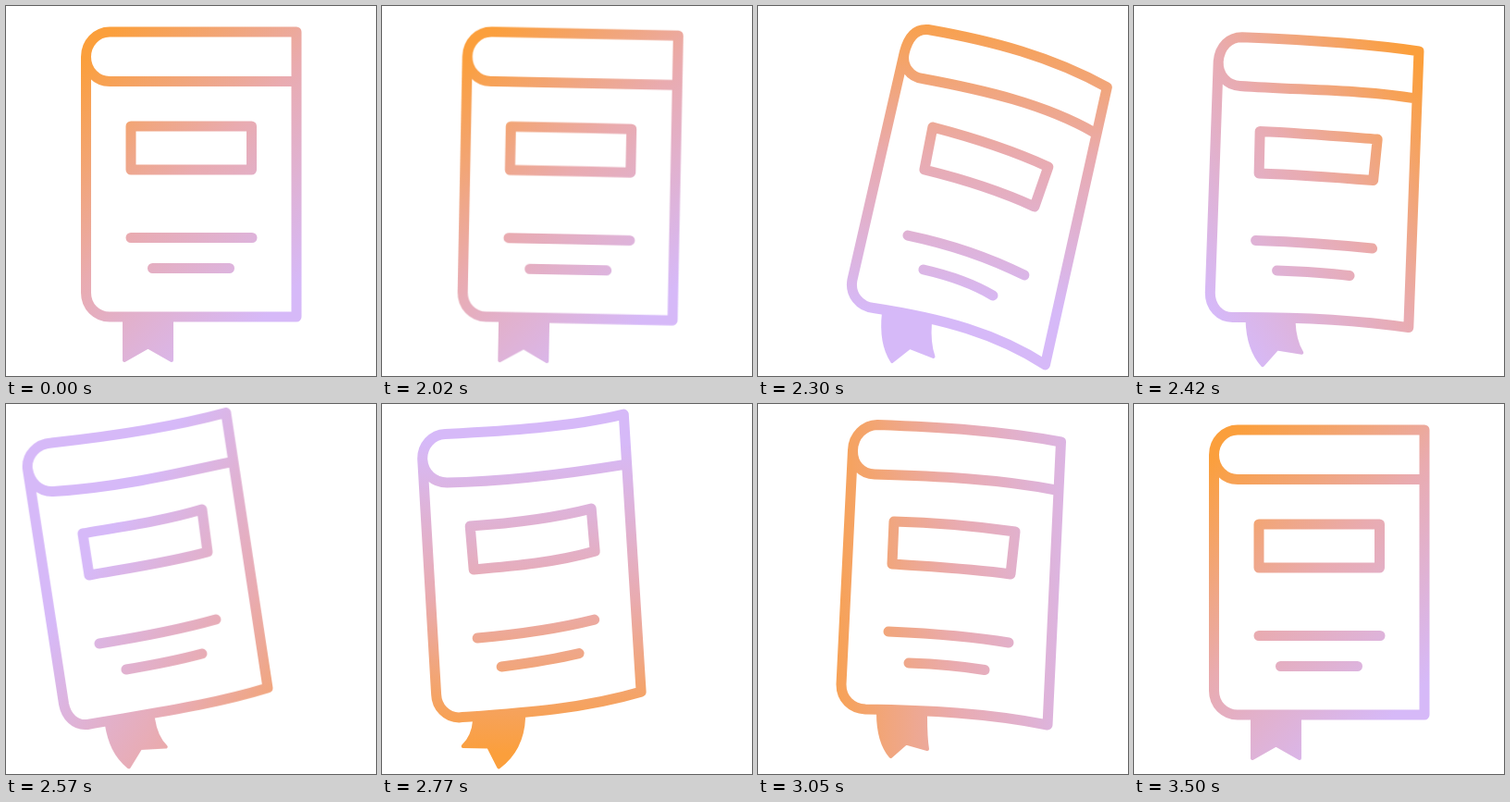
An HTML page without scripts that plays this animation: 400 px wide and 400 px high, repeating every 3.52 s.

```html
<!DOCTYPE html>
<html lang="en">
<head>
<meta charset="utf-8">
<title>Swaying book</title>
<style>
html, body { margin: 0; width: 100%; height: 100%; overflow: hidden; background: #fff; }
svg { display: block; width: 100%; height: 100%; }

.sway { transform-origin: 120px 345px; animation: sway 3520ms linear infinite; }
.line { fill: none; stroke: url(#tint); stroke-width: 11; stroke-linecap: round; stroke-linejoin: round; }
.ribbon { fill: url(#tint); stroke: url(#tint); stroke-width: 4; stroke-linejoin: round; }
.line, .ribbon { animation: 3520ms linear infinite; }
.cover { animation-name: cover; }
.label { animation-name: label; }
.text { animation-name: text; }
.ribbon { animation-name: ribbon; }

/* Kick-off, then a small overshoot at each end of the swing */
@keyframes sway {
  0%, 57.38% { transform: rotate(0deg); }
  57.386% { transform: rotate(1.1deg); }
  62.2% { transform: rotate(0deg); animation-timing-function: ease-out; }
  63.8% { transform: rotate(1.7deg); animation-timing-function: ease-in; }
  65.34%, 73.01% { transform: rotate(0deg); animation-timing-function: ease-out; }
  74.6% { transform: rotate(-2deg); animation-timing-function: ease-in-out; }
  78.69%, 100% { transform: rotate(0deg); }
}

/* Poses: rest, swung right, swung left, coming back, small swing right, rest */
@keyframes cover {
  0%, 57.386%, 99.43%, 100% {
    d: path("M112 28C180 28 247 28 314 28L314 336C247 336 180 336 112 336C98 336 86.5 325 86.5 310L86.5 55C86.5 40 98 28 112 28ZM86.5 55C86.5 70 98 81.5 112 81.5C180 81.5 247 81.5 314 81.5");
    animation-timing-function: cubic-bezier(.3,.2,.7,.9);
  }
  62.2%, 65.34% {
    d: path("M184 25.5C255 38 318 55 377.5 88L310.5 388C258 354 200 338 125 326.5C110 325 99 312 102 296L158.5 50C163 32 172 24.5 184 25.5ZM158.5 50C155 65 165 77 178 78.5C245 91 310 106 364 137");
    animation-timing-function: cubic-bezier(.3,.1,.6,.95);
  }
  73.01% {
    d: path("M49 42C115 35 180 25 238 9.5L283 307C225 325 160 334 88 346.5C75 348 65 338 62.5 324L23.5 70C22 55 34 43 49 42ZM23.5 70C26 85 36 95 51 94.5C118 91 185 75 244 62.5");
  }
  78.69% {
    d: path("M68 32.5C135 29 203 25 261 11L280 311C216 330 152 334 83 339C70 339 59 328 58.5 314L43.5 60C43 45 54 33 68 32.5ZM43.5 60C44.5 75 56 85 70 85C138 84 203 75 264 65");
    animation-timing-function: cubic-bezier(.3,.3,.6,1);
  }
  86.65% {
    d: path("M129 22.5C198 25 265 29 327.5 41L313 347C248 334 182 331 116 330C101 329 90 319 90 303L102.5 50C103 34 115 23 129 22.5ZM102.5 50C102 65 112 75.5 126 76C193 78 260 81 322 93");
    animation-timing-function: ease-in-out;
  }
}
@keyframes label {
  0%, 57.386%, 99.43%, 100% {
    d: path("M135 130C178 130 222 130 265.5 130L265.5 177C222 177 178 177 135 177Z");
    animation-timing-function: cubic-bezier(.3,.2,.7,.9);
  }
  62.2%, 65.34% {
    d: path("M189 131C235 143 275 156 314 174L299 217C262 200 225 188 180 177Z");
    animation-timing-function: cubic-bezier(.3,.1,.6,.95);
  }
  73.01% { d: path("M83 140C130 132 172 126 212 114L218 160C178 171 136 177 90 185Z"); }
  78.69% {
    d: path("M95 132C140 129 183 124 226 113L230 159C188 171 145 175 99 179Z");
    animation-timing-function: cubic-bezier(.3,.3,.6,1);
  }
  86.65% {
    d: path("M147 127C192 128 235 132 278 138L273 184C230 178 187 176 145 173Z");
    animation-timing-function: ease-in-out;
  }
}
@keyframes text {
  0%, 57.386%, 99.43%, 100% {
    d: path("M135 250.5C179 250.5 222 250.5 266 250.5M158.5 283.5C186 283.5 214 283.5 241.5 283.5");
    animation-timing-function: cubic-bezier(.3,.2,.7,.9);
  }
  62.2%, 65.34% {
    d: path("M162 248C210 258 250 272 288 291M179 285C210 292 232 300 254 313");
    animation-timing-function: cubic-bezier(.3,.1,.6,.95);
  }
  73.01% { d: path("M101 259C145 252 188 244 227 233M130 287C160 282 186 277 212 270"); }
  78.69% {
    d: path("M103 253C147 249 190 243 229.5 233M129 284C159 280 186 276 213 269.5");
    animation-timing-function: cubic-bezier(.3,.3,.6,1);
  }
  86.65% {
    d: path("M141 246C186 248 230 251 271 258M163 280C191 281 218 283 245 287.5");
    animation-timing-function: ease-in-out;
  }
}
@keyframes ribbon {
  0%, 57.386%, 99.43%, 100% {
    d: path("M128 338L179 338C179 353 179 368 179 383L153.5 368.5L128 383C128 368 128 353 128 338Z");
    animation-timing-function: cubic-bezier(.3,.2,.7,.9);
  }
  62.2%, 65.34% {
    d: path("M136 332L186 342C185 355 185 366 189.5 379L164 369L145 384C136 370 134 350 136 332Z");
    animation-timing-function: cubic-bezier(.3,.1,.6,.95);
  }
  73.01% { d: path("M109 347L159 340C161 353 165 363 173 370.5L145.5 372L133 392.5C118 380 112 365 109 347Z"); }
  78.69% {
    d: path("M100 342L153 339C152 362 143 380 126 392.5L115 370.5L87.5 370C95 363 99 355 100 342Z");
    animation-timing-function: cubic-bezier(.3,.3,.6,1);
  }
  86.65% {
    d: path("M130 334L181 337C181 350 181 361 183 373L160 366.5L143.5 381C135 371 130 355 130 334Z");
    animation-timing-function: ease-in-out;
  }
}
</style>
</head>
<body>
<svg viewBox="0 0 400 400">
  <defs>
    <!-- The gradient makes one full turn during the swing -->
    <linearGradient id="tint" gradientUnits="userSpaceOnUse" x1="-168" y1="0" x2="168" y2="0"
      gradientTransform="translate(200 180) rotate(45)">
      <stop offset="0" stop-color="#fb9f3c"/>
      <stop offset=".5" stop-color="#e9abb0"/>
      <stop offset="1" stop-color="#d6b9f8"/>
      <animateTransform attributeName="gradientTransform" type="translate" dur="3520ms" repeatCount="indefinite"
        keyTimes="0;.57386;.65341;.73011;.78693;.86648;.99432;1"
        values="200 180;200 180;200 162;222 280;170 210;215 190;200 180;200 180"/>
      <animateTransform attributeName="gradientTransform" type="rotate" additive="sum" dur="3520ms" repeatCount="indefinite"
        keyTimes="0;.57386;.65341;.73011;.78693;.86648;.99432;1"
        values="45;45;90;212;270;360;405;405"/>
    </linearGradient>
  </defs>
  <g class="sway">
    <path class="ribbon"/>
    <path class="line cover"/>
    <path class="line label"/>
    <path class="line text"/>
  </g>
</svg>
</body>
</html>
```
